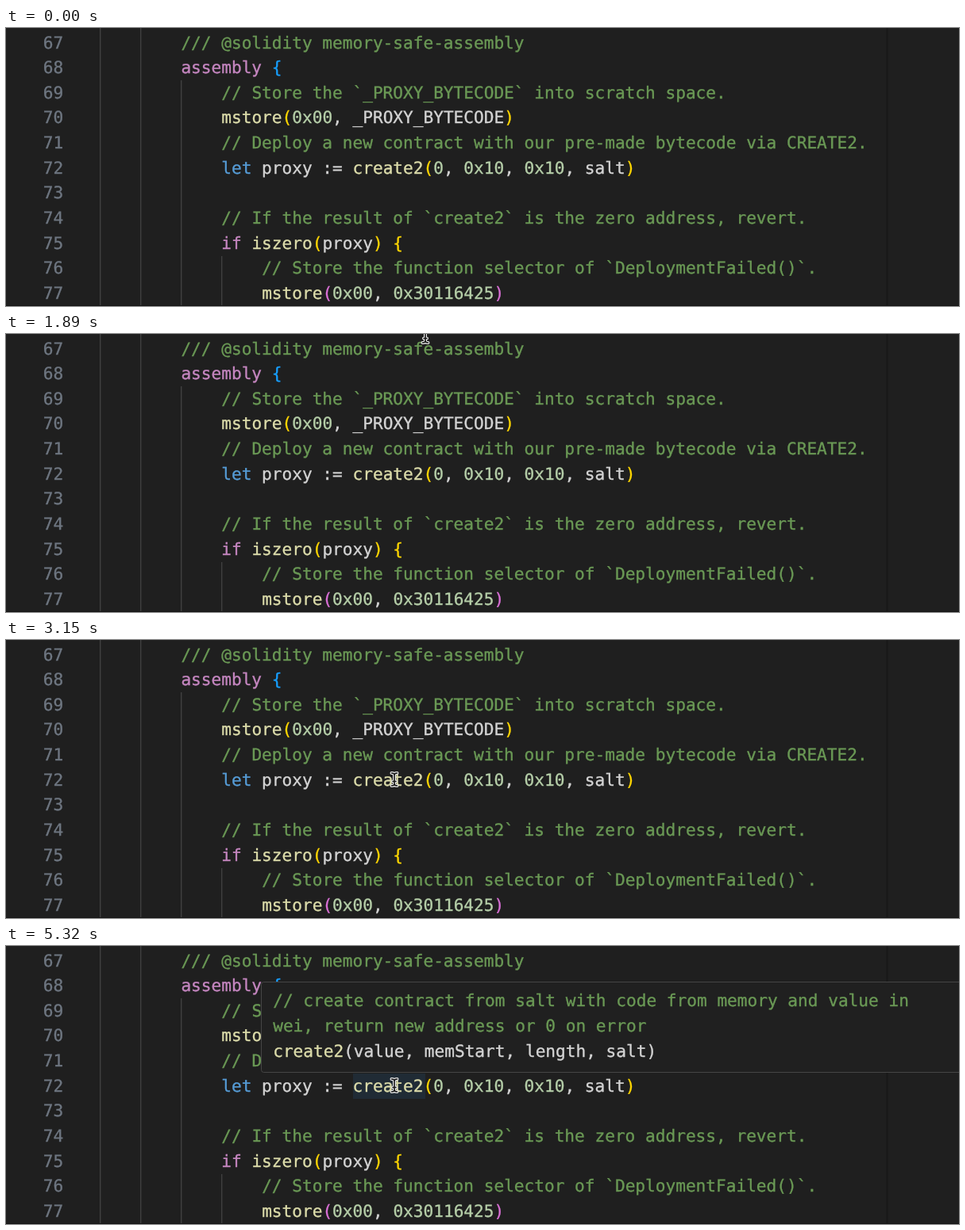
These frames come from a looping animation (1200x351 px, 5.67 s). An HTML page:

```html
<!DOCTYPE html>
<html lang="en">
<head>
<meta charset="utf-8">
<title>Hover hint in a code editor</title>
<style>
  html, body { margin: 0; width: 100%; height: 100%; overflow: hidden; background: #1f1f1f; }
  svg { display: block; }
  text {
    font: 21.12px "DejaVu Sans Mono", Menlo, monospace;
    text-rendering: geometricPrecision;
    white-space: pre;
  }
  tspan { fill: currentColor; stroke: currentColor; stroke-width: .35px; }
  .comment { color: #6a9955; }
  .keyword { color: #c586c0; }
  .storage { color: #569cd6; }
  .call { color: #dcdcaa; }
  .number { color: #b5cea8; }
  .plain { color: #d4d4d4; }
  .gold { color: #ffd700; }
  .orchid { color: #da70d6; }
  .blue { color: #179fff; }
  .gutter { color: #6e7681; }
</style>
</head>
<body>
<svg id="stage" width="1200" height="351" viewBox="0 0 1200 351">
  <rect width="1200" height="351" fill="#1f1f1f"/>
  <path d="M1109.5 0V351" stroke="#191919" stroke-width="2"/>
  <path d="M118.7 0V351M169.7 0V351M220.7 66V351M271.7 288V351" stroke="#404040" stroke-width="1.4"/>
  <rect id="highlight" x="437" y="161" width="91" height="32" fill="#264f78" fill-opacity=".25"/>
  <g id="code"></g>
  <g id="hint">
    <rect x="321.5" y="45.5" width="900" height="114" rx="3" fill="#202020" stroke="#454545"/>
  </g>
  <path d="M0 350.5H1200" stroke="#141414"/>
  <g id="pointer" fill="none" stroke-linecap="round">
    <path d="M-3.5 -8Q0 -8 0 -5.5Q0 -8 3.5 -8M0 -5.5V5.5M-3.5 8Q0 8 0 5.5Q0 8 3.5 8M-2 2.5H2" stroke="#e8e8e8" stroke-width="4"/>
    <path d="M-3.5 -8Q0 -8 0 -5.5Q0 -8 3.5 -8M0 -5.5V5.5M-3.5 8Q0 8 0 5.5Q0 8 3.5 8M-2 2.5H2" stroke="#161616" stroke-width="1.6"/>
  </g>
</svg>
<script>
const LOOP = 5670, STEP = 70;
const CELL = 12.715, ROW = 31.65, LEFT = 118.7, BASE = 25.5;
const byId = id => document.getElementById(id);

// Each line: indent in columns, then pairs of style and text.
const lines = [
  [8, 'comment', '/// @solidity memory-safe-assembly'],
  [8, 'keyword', 'assembly', 'blue', ' {'],
  [12, 'comment', '// Store the `_PROXY_BYTECODE` into scratch space.'],
  [12, 'call', 'mstore', 'gold', '(', 'number', '0x00', 'plain', ', _PROXY_BYTECODE', 'gold', ')'],
  [12, 'comment', '// Deploy a new contract with our pre-made bytecode via CREATE2.'],
  [12, 'storage', 'let', 'plain', ' proxy := ', 'call', 'create2', 'gold', '(', 'number', '0', 'plain', ', ',
    'number', '0x10', 'plain', ', ', 'number', '0x10', 'plain', ', salt', 'gold', ')'],
  [0],
  [12, 'comment', '// If the result of `create2` is the zero address, revert.'],
  [12, 'keyword', 'if', 'call', ' iszero', 'gold', '(', 'plain', 'proxy', 'gold', ') {'],
  [16, 'comment', '// Store the function selector of `DeploymentFailed()`.'],
  [16, 'call', 'mstore', 'orchid', '(', 'number', '0x00', 'plain', ', ', 'number', '0x30116425', 'orchid', ')']
];
const hintLines = [
  ['comment', '// create contract from salt with code from memory and value in'],
  ['comment', 'wei, return new address or 0 on error'],
  ['call', 'create2', 'plain', '(value, memStart, length, salt)']
];

function svgNode(parent, name, attributes) {
  const node = document.createElementNS('http://www.w3.org/2000/svg', name);
  for (const key in attributes) node.setAttribute(key, attributes[key]);
  return parent.appendChild(node);
}

function write(parent, x, y, tokens) {
  const text = svgNode(parent, 'text', { x, y });
  for (let i = 0; i < tokens.length; i += 2) {
    svgNode(text, 'tspan', { class: tokens[i] }).textContent = tokens[i + 1];
  }
}

lines.forEach(([indent, ...tokens], row) => {
  const y = BASE + row * ROW;
  write(byId('code'), 46.8, y, ['gutter', String(67 + row)]);
  write(byId('code'), LEFT + indent * CELL, y, tokens);
});
hintLines.forEach((tokens, row) => write(byId('hint'), 336.2, 76.2 + row * ROW, tokens));

const clamp = v => Math.min(1, Math.max(0, v));
const easeOut = (v, power) => 1 - (1 - v) ** power;

function render(time) {
  const t = Math.floor((time % LOOP) / STEP) * STEP;
  const travel = clamp((t - 1890) / 1260);
  const x = 528 - 39 * easeOut(travel, 2.3);
  const y = 3 + 173 * easeOut(travel, 1.85);
  byId('pointer').setAttribute('transform', `translate(${x} ${y})`);
  byId('pointer').setAttribute('visibility', t >= 1890 ? 'visible' : 'hidden');

  const shown = clamp((t - 3430) / 140);
  byId('hint').setAttribute('opacity', shown);
  byId('highlight').setAttribute('opacity', shown > 0 ? 1 : 0);
}

const start = performance.now();
function tick() {
  render(performance.now() - start);
  requestAnimationFrame(tick);
}
tick();
</script>
</body>
</html>
```
